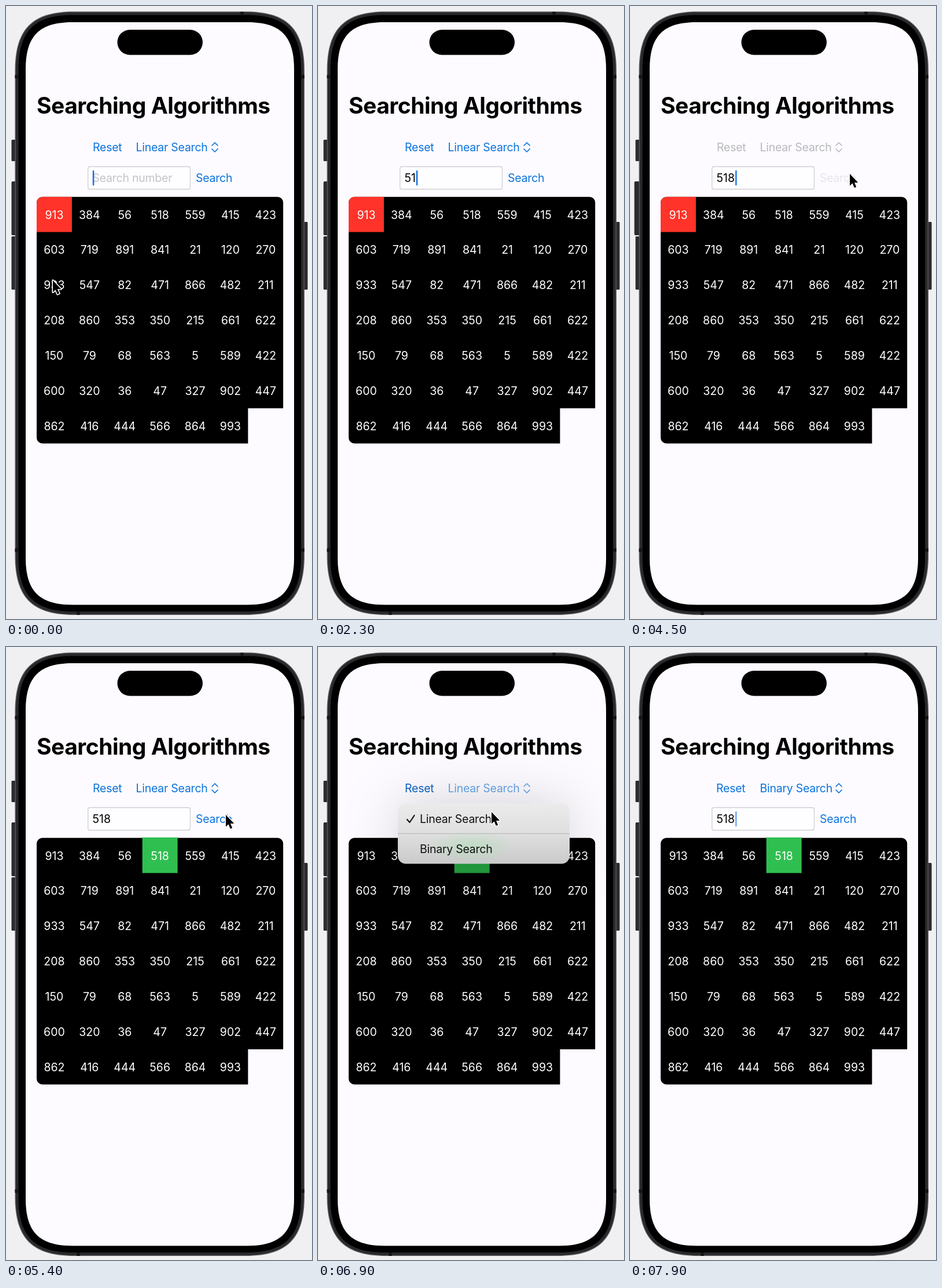
An HTML page for the animation above (8000 ms loop, 529x1059 px).

```html
<!DOCTYPE html>
<html lang="en">
<head>
<meta charset="utf-8">
<title>Searching Algorithms</title>
<style>
  html, body { margin: 0; width: 100%; height: 100%; overflow: hidden; background: #f0eff2; }
  svg { display: block; width: 100%; height: 100%; }
  text { font: 19.5px Inter, "Open Sans", sans-serif; font-optical-sizing: none; letter-spacing: -.25px; }
  .title { font-size: 39px; font-weight: 700; letter-spacing: -.5px; }
  .link { fill: #0b73dc; }
  .num { fill: #fff; text-anchor: middle; letter-spacing: 0; }
  .line { fill: none; stroke-linecap: round; stroke-linejoin: round; }
  #typed { letter-spacing: 0; }
  #bubble { filter: drop-shadow(0 2px 12px rgba(0, 0, 0, .17)); }
  #bubble text { font-size: 14.5px; }
  #menu { transform-origin: 296px 266px; filter: drop-shadow(0 0 46px rgba(0, 0, 0, .17)); }
</style>
</head>
<body>
<svg viewBox="0 0 529 1059">
  <defs>
    <clipPath id="board"><rect x="53" y="329.7" width="426.3" height="426.1" rx="10"/></clipPath>
    <linearGradient id="glass" x2="0" y2="1">
      <stop offset="0" stop-color="#ebebec"/>
      <stop offset=".5" stop-color="#dfdfdf"/>
      <stop offset="1" stop-color="#cacaca"/>
    </linearGradient>
    <radialGradient id="tint">
      <stop offset="0" stop-color="#a5dfae" stop-opacity=".5"/>
      <stop offset="1" stop-color="#a5dfae" stop-opacity="0"/>
    </radialGradient>
  </defs>

  <g fill="#2b2b2e">
    <rect x="9.500" y="231" width="9" height="37" rx="1.500"/>
    <rect id="volume" x="9.500" y="303" width="11" height="93" rx="2"/>
    <rect x="9.500" y="398" width="9" height="92" rx="1.500"/>
    <rect x="512" y="373" width="9.500" height="117" rx="1.500"/>
  </g>
  <g id="body"></g>
  <g fill="#161618">
    <rect x="15.500" y="119" width="6" height="6"/><rect x="15.500" y="937" width="6" height="6"/>
    <rect x="510" y="119" width="6" height="6"/><rect x="510" y="937" width="6" height="6"/>
    <rect x="405" y="10" width="6" height="6"/><rect x="122" y="1046" width="6" height="6"/>
  </g>
  <rect x="192.500" y="41" width="147.500" height="43.500" rx="21.750"/>

  <text class="title" x="53" y="186">Searching Algorithms</text>
  <text id="reset" class="link" x="150" y="251">Reset</text>
  <g id="picker" class="link">
    <text id="linear" x="224.500" y="251">Linear Search</text>
    <text id="binary" x="224.500" y="251" opacity="0">Binary Search</text>
  </g>
  <path id="arrows" class="line" d="M356 241l5-5 5 5M356 247l5 5 5-5" stroke="#0b73dc" stroke-width="1.700"/>

  <rect x="141.800" y="277.500" width="176.700" height="39" rx="3" fill="#fefdff" stroke="#cfcdd2" stroke-width="1.300"/>
  <text id="hint" x="149.500" y="304" fill="#c4c3c8">Search number</text>
  <text id="typed" x="149.500" y="304"><tspan>5</tspan><tspan>1</tspan><tspan>8</tspan></text>
  <rect id="caret" x="149.800" y="284" width="2.500" height="26" rx="1" fill="#1173e0"/>
  <text id="search" class="link" x="328" y="304">Search</text>

  <g clip-path="url(#board)">
    <path d="M53 329H479.500V695H418.400V757H53Z"/>
    <rect id="probe" x="53" y="329" width="60.900" height="61.500" fill="#ff3329"/>
    <rect id="found" x="235.700" y="329" width="60.900" height="61.500" fill="#2fbf50" opacity="0"/>
  </g>
  <g id="numbers"></g>

  <g id="bubble" opacity="0">
    <path d="M119 228H183a10 10 0 0 1 10 10V259a10 10 0 0 1-10 10H162l-7 6q-3 2-6 0l-7-6H119a10 10 0 0 1-10-10V238a10 10 0 0 1 10-10Z" fill="#f6f5f8" fill-opacity=".88"/>
    <text x="151" y="253.500" text-anchor="middle" fill="#1c1c1e">SlipText</text>
  </g>

  <g id="menu" opacity="0">
    <rect x="138" y="270" width="297" height="104.500" rx="14" fill="url(#glass)"/>
    <ellipse cx="266" cy="345" rx="75" ry="29" fill="url(#tint)"/>
    <path d="M138 322.300H435" stroke="#b5b5b6"/>
    <path class="line" d="M154 298l4.500 5 8-12" stroke="#111" stroke-width="2.200"/>
    <text x="176" y="304" fill="#111">Linear Search</text>
    <text x="176" y="356" fill="#111">Binary Search</text>
  </g>

  <path id="cursor" d="M0 0V20.500L4.600 16.300 7.800 24 11.200 22.600 8 15H14.300Z" stroke="#fff" stroke-width="3.200" stroke-linejoin="round" paint-order="stroke"/>
</svg>

<script>
const LOOP = 8000, CELL = 60.9, COLS = 7;
const BLUE = '#0b73dc', GREY = '#b9b8bc';
const values = `913 384 56 518 559 415 423 603 719 891 841 21 120 270
  933 547 82 471 866 482 211 208 860 353 350 215 661 622 150 79 68 563 5 589 422
  600 320 36 47 327 902 447 862 416 444 566 864 993`.split(/\s+/);
const $ = id => document.getElementById(id);

function add(parent, tag, attributes) {
  const el = document.createElementNS('http://www.w3.org/2000/svg', tag);
  for (const name in attributes) el.setAttribute(name, attributes[name]);
  parent.append(el);
  return el;
}

// Rounded rectangle with smooth corners that start well before the arc would.
function slab(left, top, right, bottom, radius, fill) {
  const e = radius * 1.25, c = e * .29;
  const d = `M${left + e} ${top}H${right - e}
    C${right - c} ${top} ${right} ${top + c} ${right} ${top + e}V${bottom - e}
    C${right} ${bottom - c} ${right - c} ${bottom} ${right - e} ${bottom}H${left + e}
    C${left + c} ${bottom} ${left} ${bottom - c} ${left} ${bottom - e}V${top + e}
    C${left} ${top + c} ${left + c} ${top} ${left + e} ${top}Z`;
  add($('body'), 'path', { d, fill });
}
slab(15.5, 9.5, 516, 1052, 82, '#57575a');
slab(17, 11, 514.5, 1050.5, 80.5, '#29292c');
slab(21.5, 15.5, 510, 1046, 76, '#000');
slab(34, 28, 498, 1034.5, 65, '#fdfbff');

values.forEach((value, i) => {
  const x = 53 + CELL * (i % COLS + .5);
  const y = 367.5 + CELL * Math.floor(i / COLS);
  add($('numbers'), 'text', { class: 'num', x, y }).textContent = value;
});

// Each step is [milliseconds, value, optional easing towards the next step].
function play(el, prop, steps, easing = 'linear') {
  const frames = steps.map(([ms, value, ease = easing]) =>
    ({ offset: ms / LOOP, [prop]: value, easing: ease }));
  frames.push({ offset: 1, [prop]: steps.at(-1)[1] });
  el.animate(frames, { duration: LOOP, iterations: Infinity });
}
const HOLD = 'steps(1, end)';
const jump = (el, prop, steps) => play(el, prop, steps, HOLD);
const at = (x, y = 0) => `translate(${x}px, ${y}px)`;

// Pointer and side button
play($('cursor'), 'transform', [
  [0, at(81, 474)], [100, at(81, 474)], [600, at(160, 292)], [1000, at(160, 292)],
  [1350, at(-25, 480), HOLD], [3250, at(545, 400)], [3900, at(380, 290)],
  [5500, at(380, 290)], [6100, at(300, 243)], [6450, at(300, 243)], [6800, at(300, 285)],
  [7050, at(300, 285)], [7250, at(300, 340)], [7400, at(300, 340)], [7850, at(545, 400)]
], 'ease-in-out');
jump($('volume'), 'transform',
  [[0, at(0)], [1250, at(-2)], [1850, at(0)], [4250, at(-2)], [4850, at(0)]]);

// Text field
const TYPED = [1900, 2150, 2400];
jump($('hint'), 'opacity', [[0, 1], [TYPED[0], 0]]);
document.querySelectorAll('#typed tspan').forEach((digit, i) =>
  jump(digit, 'fillOpacity', [[0, 0], [TYPED[i], 1]]));
jump($('caret'), 'transform',
  [[0, at(0)], [TYPED[0], at(12)], [TYPED[1], at(20)], [TYPED[2], at(32.3)]]);
play($('caret'), 'opacity', [
  [0, 1], [400, 1], [550, 0], [800, 0], [950, 1], [2500, 1], [2600, 0], [2850, 0], [3000, 1],
  [3400, 1], [3550, 0], [3800, 0], [3950, 1], [4550, 1], [4700, 0], [7780, 0], [7900, .65]
]);
play($('bubble'), 'opacity', [[0, 0], [950, 0], [1150, 1], [1750, 1], [1900, 0]]);

// Search run
const START = 4400, DONE = 5400;
for (const [id, prop] of [['picker', 'fill'], ['arrows', 'stroke'], ['search', 'fill']])
  jump($(id), prop, [[0, BLUE], [START, GREY], [DONE, BLUE]]);
play($('search'), 'opacity', [[0, 1], [4250, 1], [4320, .3], [4500, .33], [4750, 1]]);
jump($('probe'), 'transform', [[0, at(0)], [4750, at(CELL)], [5050, at(2 * CELL)]]);
jump($('probe'), 'opacity', [[0, 1], [DONE, 0]]);
jump($('found'), 'opacity', [[0, 0], [DONE, 1]]);

// Algorithm menu, which dims the colours around it
const OPEN = 6420, SHUT = 7380;
const dim = (color, dark) => [[OPEN, color], [OPEN + 300, dark], [SHUT, dark], [SHUT + 220, color]];
play($('menu'), 'opacity', [[0, 0], [OPEN, 0], [OPEN + 180, 1], [SHUT, 1], [SHUT + 220, 0]]);
play($('menu'), 'transform', [
  [0, 'scale(.2)'], [OPEN, 'scale(.2)', 'ease-out'], [OPEN + 360, 'scale(1)'],
  [SHUT, 'scale(1)', 'ease-in'], [SHUT + 220, 'scale(.2)']
]);
play($('found'), 'fill', [[0, '#2fbf50'], ...dim('#2fbf50', '#25a341')]);
play($('reset'), 'fill',
  [[0, BLUE, HOLD], [START, GREY, HOLD], [DONE, BLUE], ...dim(BLUE, '#0a64c6')]);
for (const id of ['picker', 'arrows'])
  play($(id), 'opacity', [[0, 1], [6320, 1], [6450, .63], [7450, .63], [7650, 1]]);
const PICKED = 7500;
jump($('linear'), 'opacity', [[0, 1], [PICKED, 0]]);
jump($('binary'), 'opacity', [[0, 0], [PICKED, 1]]);
jump($('reset'), 'transform', [[0, at(0)], [PICKED, at(-1)]]);
</script>
</body>
</html>
```
